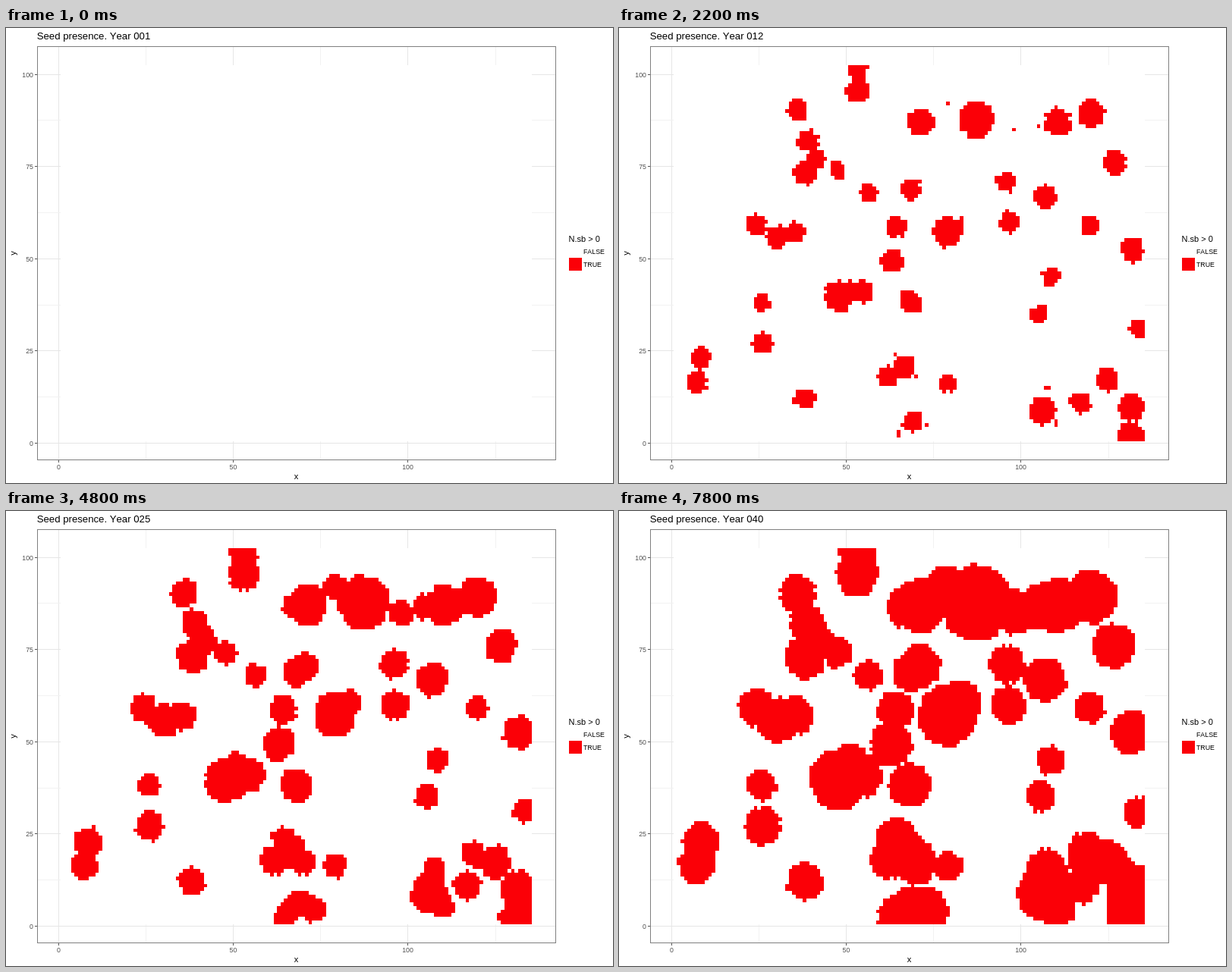
Animation of 800 by 600 pixels, one loop 8000 ms. Source, as an HTML page:

```html
<!DOCTYPE html>
<html lang="en">
<head>
<meta charset="utf-8">
<title>Seed presence</title>
<style>
  html, body { margin: 0; width: 100%; height: 100%; overflow: hidden; background: #fff; }
  svg { display: block; width: 800px; height: 600px; font-family: "Liberation Sans", Arial, sans-serif; font-size: 8.8px; font-kerning: none; }
  .title { font-size: 13.2px; }
  .label { font-size: 11px; }
  .tick { fill: #4d4d4d; }
  .seed { fill: #fb0007; }
</style>
</head>
<body>
<svg viewBox="0 0 800 600">
  <g id="axes"></g>
  <rect x="72" y="49" width="621" height="496" fill="#fff"/>
  <path class="seed" id="seeds"/>
  <rect x="41.5" y="24.5" width="683" height="545" fill="none" stroke="#7f7f7f"/>
  <text class="title" id="title" x="40.7" y="15"></text>
  <text class="label" x="382.5" y="595" text-anchor="middle">x</text>
  <text class="label" transform="translate(13 297) rotate(-90)" text-anchor="middle">y</text>
  <text class="label" x="741.5" y="282">N.sb &gt; 0</text>
  <rect class="seed" x="742" y="303" width="17" height="17"/>
  <text x="761" y="298">FALSE</text>
  <text x="761" y="315">TRUE</text>
</svg>
<script>
const YEAR_MS = 200, YEARS = 40, SETTLED = 8, SPREAD = 11;
const COLS = 135, ROWS = 102;
const $ = id => document.getElementById(id);
const px = x => 69.5 + 4.604 * x;
const py = y => 547.5 - 4.865 * y;

// Where the first plants stand, by the radius their patch reaches
const plants = {
  4.2: [[47.5, 74], [56.3, 68], [119.7, 59.2], [25.8, 38.2], [108.5, 45], [105.3, 35.1],
    [133.5, 31], [79.1, 16.3]],
  5.2: [[36, 90.3], [39, 82], [41.2, 77], [68.3, 68.8], [96, 71], [96.5, 60], [24.3, 59.2],
    [35.5, 57], [64.2, 58.7], [26, 27.1], [8.4, 23], [7.3, 16.7], [38, 12.2], [61.8, 18],
    [69, 5.8], [117, 11], [53, 101]],
  6.1: [[53.2, 95.3], [38.2, 73], [126.7, 76], [107, 66.8], [131.7, 52.4], [30.3, 55.8],
    [63, 49.3], [54.5, 41], [68.2, 38.3], [66.5, 20.6], [124.8, 17.4]],
  7.5: [[71.5, 87], [110.5, 87], [120, 89.3], [106.2, 8.8], [131.8, 9.6], [131.6, 2]],
  8.5: [[79, 57.3], [48, 39.8]],
  10.3: [[87.2, 87.7]]
};

// Later plants at the rim of older patches
const offshoots = [[79, 92], [98, 85], [67.5, 86.5], [105, 86.5], [71, 70.5], [83, 60.5], [51, 43.5],
  [64.5, 23.5], [70, 17.5], [65, 2.5], [73, 4.5], [107.5, 15], [110, 5.5], [119, 19.5]];

function drawAxes() {
  const parts = [];
  const line = (d, color) => parts.push(`<path d="${d}" stroke="${color}"/>`);
  const text = (x, y, anchor, s) =>
    parts.push(`<text class="tick" x="${x}" y="${y}" text-anchor="${anchor}">${s}</text>`);
  const snap = v => Math.floor(v) + 0.5;
  for (let v = 0; v <= 125; v += 25) {
    const x = snap(px(v)), major = v % 50 === 0;
    line(`M${x} 25V569`, major ? "#e6e6e6" : "#f2f2f2");
    if (major) {
      line(`M${x} 570v3`, "#555");
      text(x, 582, "middle", v);
    }
  }
  for (let v = 0; v <= 100; v += 12.5) {
    const y = snap(py(v)), major = v % 25 === 0;
    line(`M42 ${y}H724`, major ? "#e6e6e6" : "#f2f2f2");
    if (major) {
      line(`M38 ${y}h3`, "#555");
      text(36, y + 3.1, "end", v);
    }
  }
  $("axes").innerHTML = parts.join("");
}

// Quick first scatter, then steady growth up to the full radius
function plantRadius(full, year) {
  const settled = 0.9 + 0.33 * full;
  if (year < SETTLED) return settled * ((year - 1) / (SETTLED - 1)) ** 0.3;
  return settled + (full - settled) * (year - SETTLED) / (YEARS - SETTLED);
}

function patches(year) {
  const list = [];
  if (year < 2) return list;
  for (const [full, spots] of Object.entries(plants))
    for (const [x, y] of spots) list.push([x, y, plantRadius(+full, year)]);
  const age = Math.max(0, (year - SPREAD) / (YEARS - SPREAD));
  for (const [x, y] of offshoots) list.push([x, y, 6 * age ** 0.7]);
  return list;
}

// Fixed roughness of each cell, -0.35 to 0.35
function rough(i, j) {
  const h = Math.sin(i * 127.1 + j * 311.7) * 43758.5453;
  return (h - Math.floor(h) - 0.5) * 0.7;
}

function seedPath(year) {
  const list = patches(year);
  const edge = i => Math.round(px(i - 0.5));
  let d = "";
  for (let j = 1; j <= ROWS; j++) {
    const row = list.filter(([, y, r]) => r > 0 && Math.abs(y - j) < r + 0.5);
    const top = Math.round(py(j + 0.5)), bottom = Math.round(py(j - 0.5));
    let start = 0;
    for (let i = 1; i <= COLS + 1; i++) {
      const e = rough(i, j);
      const on = i <= COLS && row.some(([x, y, r]) => Math.hypot(x - i, y - j) < r + e);
      if (on && !start) start = i;
      if (!on && start) {
        d += `M${edge(start)} ${top}H${edge(i)}V${bottom}H${edge(start)}Z`;
        start = 0;
      }
    }
  }
  return d;
}

let shown = 0;
function update(ms) {
  const year = Math.floor(ms / YEAR_MS) % YEARS + 1;
  if (year === shown) return;
  shown = year;
  $("title").textContent = "Seed presence. Year " + String(year).padStart(3, "0");
  $("seeds").setAttribute("d", seedPath(year));
}

drawAxes();
update(0);
const begin = performance.now();
function tick() {
  update(performance.now() - begin);
  requestAnimationFrame(tick);
}
requestAnimationFrame(tick);
</script>
</body>
</html>
```
